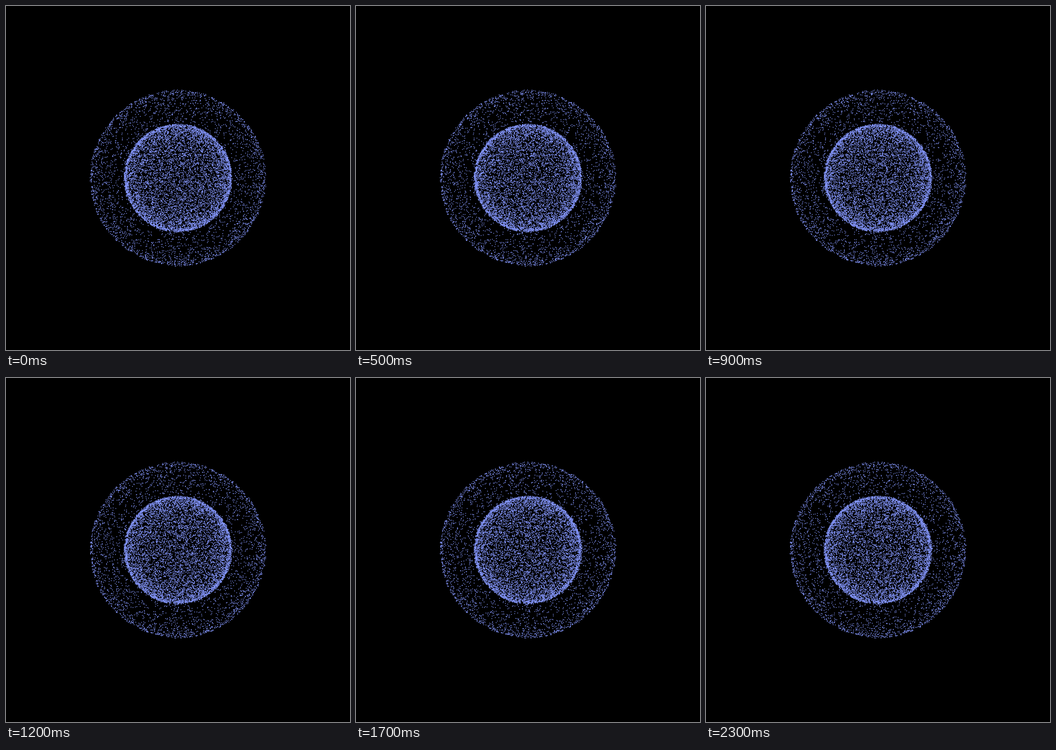
Write an HTML page with a canvas that moves like this. It is 748 px wide and 748 px high and loops after 2.4 s.

```html
<!DOCTYPE html>
<html>
<head>
<meta charset="utf-8">
<style>
  html, body { margin: 0; height: 100%; overflow: hidden; background: #000; }
  canvas { display: block; }
</style>
</head>
<body>
<canvas width="748" height="748"></canvas>
<script>
const ctx = document.querySelector('canvas').getContext('2d');
const CENTER = 374, DOT = 1.6, SPIN = 0.06, LOOP = 2400, STEP = 100;

let seed = 7;
function random() {
  seed = (seed * 1664525 + 1013904223) % 4294967296;
  return seed / 4294967296;
}

// Evenly scattered points in a thin spherical shell
function shell(count, inner, outer) {
  return Array.from({ length: count }, () => {
    const radius = inner + (outer - inner) * random();
    const y = 2 * random() - 1;
    return { y: y * radius, ring: Math.sqrt(1 - y * y) * radius, angle: random() * 2 * Math.PI };
  });
}

const points = [...shell(3900, 188, 191.8), ...shell(8000, 113.5, 118)];

function draw(time) {
  const turn = SPIN * time / 1000;
  ctx.fillStyle = '#000';
  ctx.fillRect(0, 0, 748, 748);
  ctx.fillStyle = '#8698ff';
  for (const p of points) {
    const x = CENTER + p.ring * Math.sin(p.angle + turn);
    ctx.fillRect(x - DOT / 2, CENTER + p.y - DOT / 2, DOT, DOT);
  }
}

const start = performance.now();
let shown = -1;
function tick() {
  const time = Math.floor((performance.now() - start) % LOOP / STEP) * STEP;
  if (time !== shown) draw(shown = time);
  requestAnimationFrame(tick);
}
tick();
</script>
</body>
</html>
```
